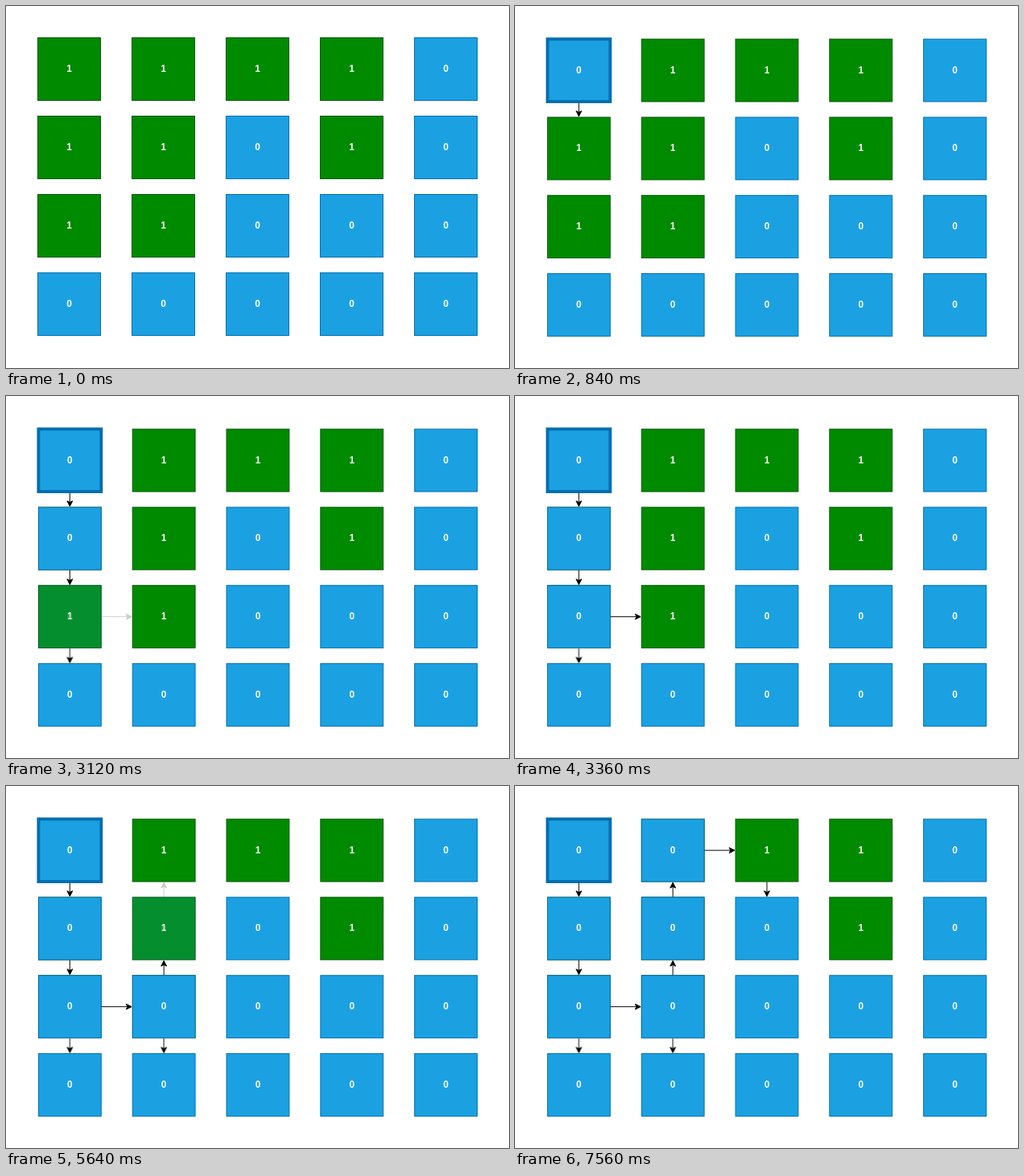
Animation of 641 by 462 pixels, one loop 8 s. Source, as an HTML page:

```html
<!DOCTYPE html>
<html lang="en">
<head>
<meta charset="utf-8">
<title>Grid flood fill</title>
<style>
html, body { margin: 0; width: 100%; height: 100%; overflow: hidden; background: #fff; }
svg { display: block; width: 641px; height: 462px; }
text { font: bold 12px "Liberation Sans", Arial, sans-serif; fill: #fff; text-anchor: middle; }
.zero { fill: #1ba1e2; stroke: #006eaf; }
.one { fill: #008a00; stroke: #005700; }
.start { stroke-width: 4; }
.arrow { fill: #000; stroke: #000; stroke-miterlimit: 10; }
</style>
</head>
<body>
<svg id="stage" viewBox="0 0 641 462"></svg>
<script>
const LOOP = 8000, FIRST = 600, EVERY = 840, FADE = 300;
const GRID = ["11110", "11010", "11000", "00000"];
const TURN = { right: 0, down: 90, left: 180, up: 270 };
const SHIFT = 'transform="scale(.9984 .9978) translate(1 1.8)"';

const midX = col => 80.5 + 120 * col;
const midY = row => 80.5 + 100 * row;

function cell(row, col, value, extra = "") {
  const x = midX(col), y = midY(row);
  return `<rect class="${value === "1" ? "one" : "zero"} ${extra}" x="${x - 40}" y="${y - 40}" width="80" height="80"/>
    <text x="${x}" y="${y + 3.5}">${value}</text>`;
}

function arrow(row, col, dir, from = 40.5) {
  const gap = TURN[dir] % 180 ? 20 : 40;
  const tip = 40 + gap - 1.12;
  return `<path class="arrow" transform="translate(${midX(col)} ${midY(row)}) rotate(${TURN[dir]})"
    d="M${from} 0H${tip - 5.25}M${tip} 0l-7-3.5 1.75 3.5-1.75 3.5z"/>`;
}

const board = GRID.map((line, r) => [...line].map((v, c) => cell(r, c, v)).join("")).join("");
const visit = (row, col, dir) => cell(row, col, "0") + arrow(row, col, dir);

// Each step fades in over everything before it.
const steps = [
  '<rect x="-9" y="-9" width="670" height="490" fill="#fff"/>' + board +
    cell(0, 0, "0", "start") + arrow(0, 0, "down", 42),
  visit(1, 0, "down"),
  arrow(2, 0, "down"),
  visit(2, 0, "right"),
  arrow(2, 1, "down"),
  visit(2, 1, "up"),
  visit(1, 1, "up"),
  visit(0, 1, "right"),
  arrow(0, 2, "down")
];

const percent = ms => ms / LOOP * 100 + "%";
const rules = steps.map((_, i) => {
  const begin = FIRST + EVERY * i;
  return `@keyframes show${i} {
    0% { opacity: 0 }
    ${percent(begin)} { opacity: 0; animation-timing-function: steps(5, start) }
    ${percent(begin + FADE)}, 100% { opacity: 1 }
  }
  #step${i} { animation: show${i} ${LOOP}ms linear infinite }`;
});

const style = document.createElement("style");
style.textContent = rules.join("\n");
document.head.append(style);
document.getElementById("stage").innerHTML = board +
  `<g ${SHIFT}>${steps.map((s, i) => `<g id="step${i}">${s}</g>`).join("")}</g>`;
</script>
</body>
</html>
```
